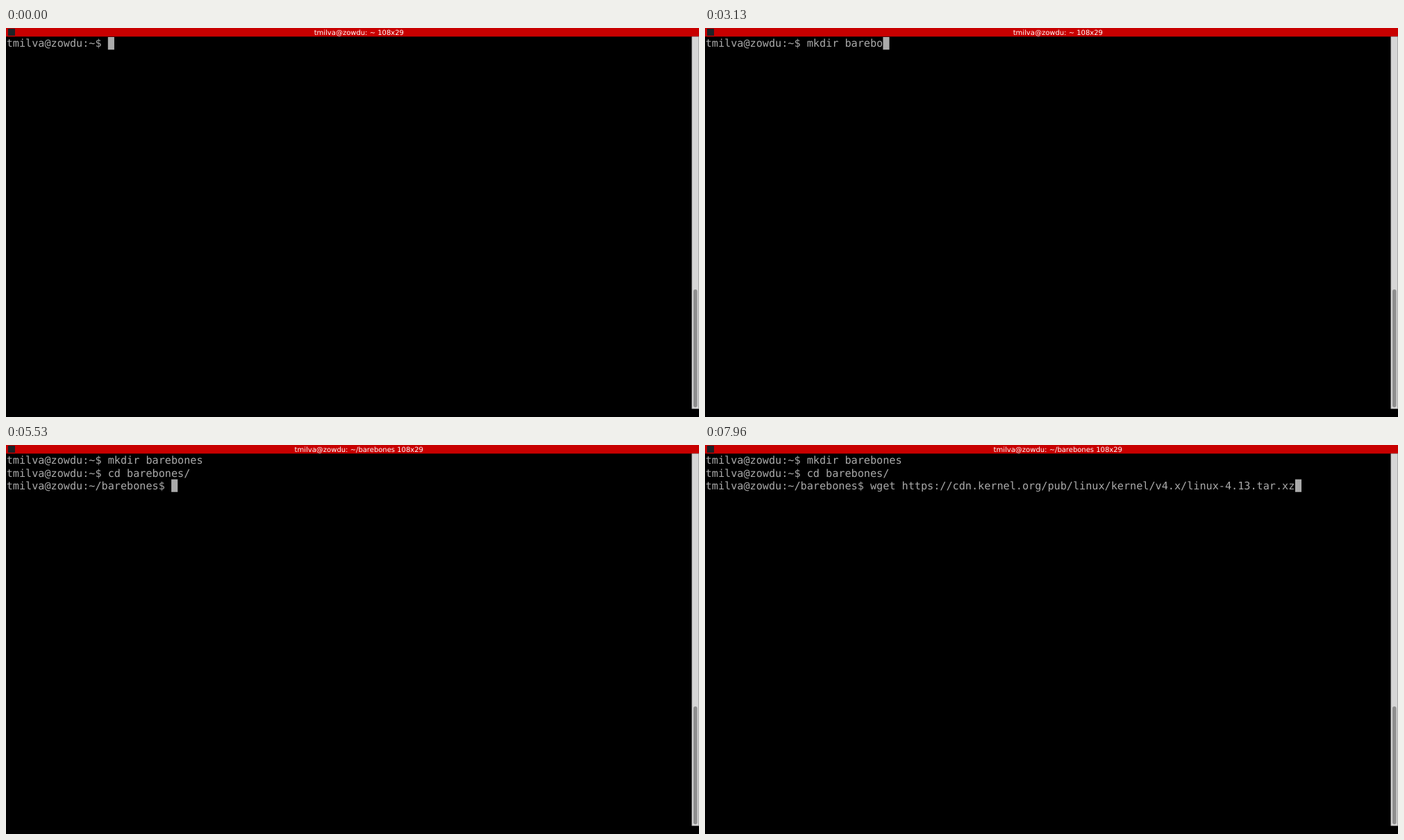
These frames come from a looping animation (998 by 561 pixels, 8000 ms). An HTML page:

```html
<!DOCTYPE html>
<html lang="en">
<head>
<meta charset="utf-8">
<title>Terminal</title>
<style>
  html, body { margin: 0; width: 100%; height: 100%; overflow: hidden; background: #000; }
  svg { display: block; width: 998px; height: 561px; }
  text { white-space: pre; text-rendering: geometricPrecision; }
  .line { font: 15.166px "DejaVu Sans Mono", monospace; fill: #aaa; }
  #title { font: 10px "DejaVu Sans", sans-serif; fill: #fff; text-anchor: middle; }
</style>
</head>
<body>
<svg viewBox="0 0 998 561">
  <rect width="998" height="561" fill="#000"/>
  <rect width="998" height="12.4" fill="#c80000"/>
  <rect x="3" y="1" width="10" height="10" fill="#1c2226"/>
  <text id="title" x="508.3" y="9.6"></text>
  <rect x="987.9" y="12.7" width="9.8" height="536.3" fill="#d6d6d6" stroke="#b0b0b0" stroke-width="0.65"/>
  <rect x="990" y="377" width="5.5" height="170" rx="2.75" fill="#8e8e8e"/>
  <rect id="cursor" width="9.13" height="18.26" fill="#aaa"/>
  <text class="line"></text>
  <text class="line"></text>
  <text class="line"></text>
</svg>
<script>
const LOOP = 8000, COL = 9.131, ROW = 18.26, LEFT = 0.7, TOP = 13, ASCENT = 14.35;
const HOST = "tmilva@zowdu";
const URL_TEXT = "https://cdn.kernel.org/pub/linux/kernel/v4.x/linux-4.13.tar.xz";

// Each entry: [time, text typed at that moment]
const keys = (text, times) => times.map((t, i) => [t, text[i]]);
const rows = [
  { start: 0, dir: "~",
    input: keys("mkdir barebones", [1870, 2000, 2120, 2240, 2350, 2470,
      2600, 2710, 2820, 2930, 3040, 3130, 3220, 3300, 3760]) },
  { start: 4000, dir: "~",
    input: [...keys("cd ba", [4430, 4560, 4680, 4800, 4900]), [5060, "rebones/"]] },
  { start: 5510, dir: "~/barebones",
    input: [...keys("wget ", [6830, 7100, 7190, 7280, 7370]), [7760, URL_TEXT]] }
];

// Spans in which the blinking cursor is hidden
const hidden = [[570, 1150], [1770, 1870], [6040, 6690]];

const lines = document.querySelectorAll(".line");
const title = document.getElementById("title");
const cursor = document.getElementById("cursor");

lines.forEach((line, i) => {
  line.setAttribute("x", LEFT);
  line.setAttribute("y", TOP + ASCENT + i * ROW);
});

function setText(el, text) {
  if (el.textContent !== text) el.textContent = text;
}

function lineAt(row, t) {
  if (t < row.start) return "";
  const typed = row.input.filter(([at]) => at <= t).map(([, text]) => text).join("");
  return `${HOST}:${row.dir}$ ${typed}`;
}

function draw(t) {
  let last = 0;
  rows.forEach((row, i) => {
    if (t >= row.start) last = i;
    setText(lines[i], lineAt(row, t));
  });
  setText(title, `${HOST}: ${rows[last].dir} 108x29`);
  cursor.setAttribute("x", LEFT + lineAt(rows[last], t).length * COL);
  cursor.setAttribute("y", TOP + last * ROW);
  const off = hidden.some(([from, to]) => t >= from && t < to);
  cursor.setAttribute("visibility", off ? "hidden" : "visible");
}

const begin = performance.now();
function tick() {
  draw((performance.now() - begin) % LOOP);
  requestAnimationFrame(tick);
}
tick();
</script>
</body>
</html>
```
